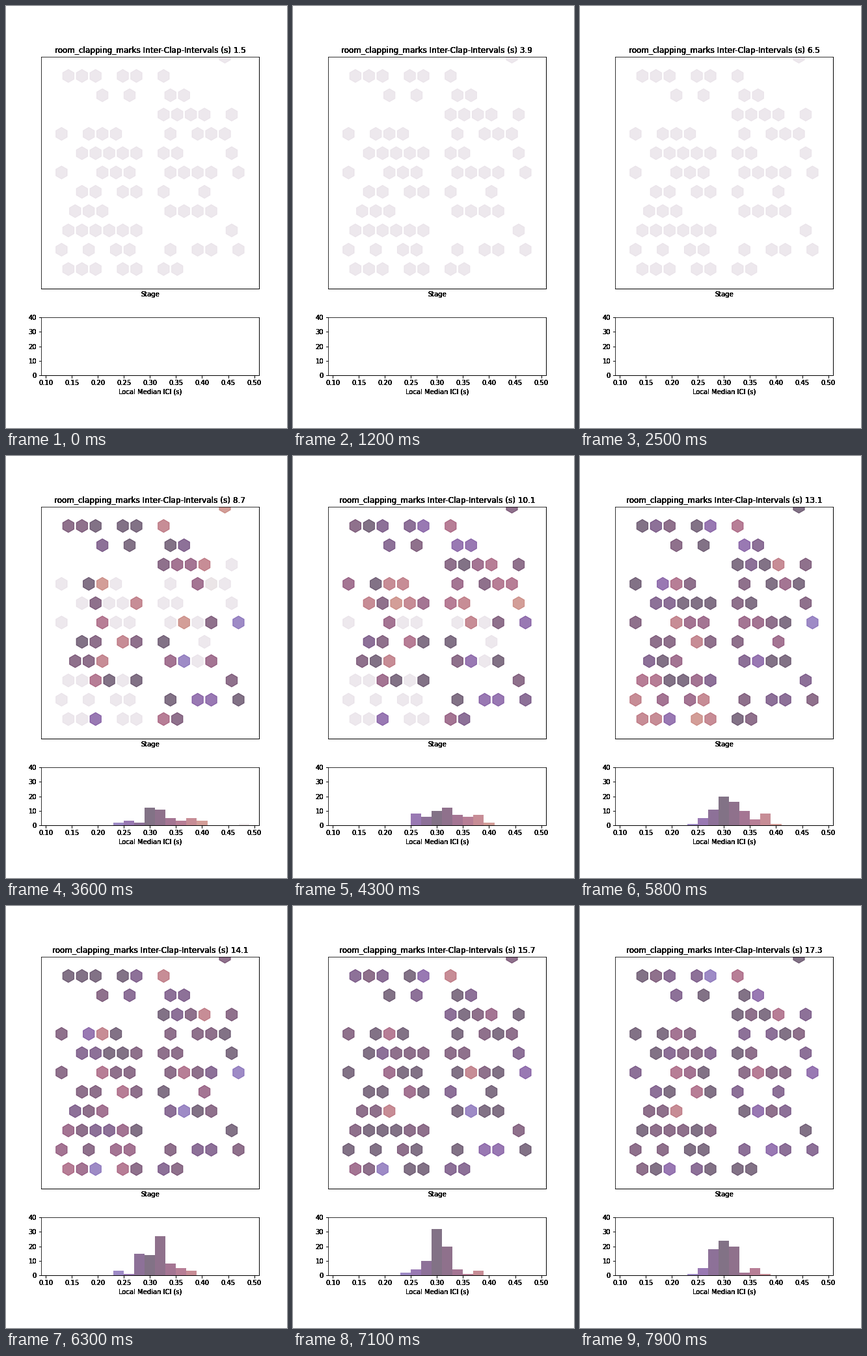
These frames come from a looping animation (432 by 648 pixels, 8000 ms). A matplotlib script:

```python
import numpy as np
import matplotlib.pyplot as plt
from matplotlib.animation import FuncAnimation

FRAMES, STEP = 80, 100                  # frames, ms per frame
BINS, LOW, WIDTH = 19, 0.11, 0.02       # histogram bins in seconds
COMMON = 9                              # bin the crowd settles on
ALPHA = 0.6
LAYERS = 6                              # stacked axes thicken the lettering

# Taken columns, front row first; every second row is shifted by half a seat.
PLAN = [
    [2, 3, 4, 6, 7, 9, 10],
    [1, 3, 5, 6, 9, 11, 12, 14],
    [2, 3, 4, 5, 6, 7, 14],
    [2, 3, 4, 9, 10, 11, 12],
    [3, 4, 6, 7, 9, 12],
    [1, 4, 5, 6, 9, 10, 11, 12, 14],
    [3, 4, 5, 6, 7, 9, 10, 14],
    [1, 3, 4, 5, 9, 11, 12, 13],
    [9, 10, 11, 12, 14],
    [4, 6, 9, 10],
    [2, 3, 4, 6, 7, 9],
    [13],
]

# Parts of the hall that join late, clap slowly or clap fast.
QUIET = [(2.5, 1.9), (6.2, 1.9), (5.7, 6.8), (8.8, 7), (14, 8), (11.5, 5), (1.9, 7)]
SLOW = [(4.5, 4), (4.5, 6), (4.5, 8), (6, 5), (12, 9), (10.5, 6), (9, 11)]
FAST = [(10, 10), (7, 11), (3.7, 7.5), (10.5, 4), (12, 2), (4, 1), (14.5, 6)]

rng = np.random.default_rng(7)
cmap = plt.get_cmap("twilight")

seats = np.array([(c + 0.5 * (r % 2), r + 1)
                  for r, cols in enumerate(PLAN) for c in cols])
x, y = seats.T
count = len(seats)


def dist2(spots):
    """Squared distance of every seat to every spot."""
    return ((seats[:, None] - np.array(spots)) ** 2).sum(axis=2)


def pull(spots):
    return np.exp(-dist2(spots) / 0.5).sum(axis=1)


# The early crowd joins within a second, quiet parts follow from back to front.
late = dist2(QUIET).min(axis=1) < 1.25 ** 2
onset = np.where(late, 3650 + 250 * (9 - y), rng.uniform(2650, 3600, count))

home = COMMON + 3.2 * pull(SLOW) - 2.4 * pull(FAST)
lag = np.where(late, 5, rng.exponential(1.5, count))
phase = rng.uniform(0, 2 * np.pi, count)
period = rng.uniform(2500, 5000, count)


def levels_at(ms):
    """Bin of each seat, 0 while silent: a slow start eases into a wavering pace."""
    age = np.maximum(ms - onset, 0)
    waver = 0.9 * np.sin(2 * np.pi * ms / period + phase)
    pace = home + waver + lag * np.exp(-age / 800)
    return np.where(ms >= onset, np.clip(np.rint(pace), 5, BINS - 1), 0).astype(int)


def tint(level):
    r, g, b, _ = cmap((level + 0.5) / BINS if level else 0.0)
    return r, g, b, ALPHA


fig = plt.figure(figsize=(6, 9), dpi=72, facecolor="white")
grid = fig.add_gridspec(2, 1, height_ratios=[4, 1], left=0.125, right=0.9,
                        bottom=0.125, top=0.88, hspace=0.2)


def layered(cell, **props):
    axes = [fig.add_subplot(cell) for _ in range(LAYERS)]
    for ax in axes:
        ax.set(**props)
    return axes


stages = layered(grid[0], xlim=(0, 16), ylim=(0, 12), xticks=[], yticks=[],
                 xlabel="Stage")
hists = layered(grid[1], xlim=(0.091, 0.509), ylim=(0, 40),
                xticks=np.arange(0.10, 0.51, 0.05), yticks=range(0, 41, 10),
                xlabel="Local Median ICI (s)")
titles = [ax.set_title("") for ax in stages]

dots = stages[-1].scatter(x, y, s=400, marker="h", color=[tint(0)] * count)
bars = hists[-1].bar(LOW + WIDTH * np.arange(BINS), np.zeros(BINS), WIDTH,
                     align="edge", color=[tint(b) for b in range(BINS)])


def draw(i):
    levels = levels_at(i * STEP)
    dots.set_color([tint(v) for v in levels])
    heights = np.bincount(levels[levels > 0], minlength=BINS)
    for bar, h in zip(bars, heights):
        bar.set_height(h)
    for title in titles:
        title.set_text(f"room_clapping_marks Inter-Clap-Intervals (s) {1.5 + 0.2 * i:.1f}")
    return [dots, *bars, *titles]


anim = FuncAnimation(fig, draw, frames=FRAMES, interval=STEP,
                     repeat=True, repeat_delay=0, blit=False)
plt.show()
```
